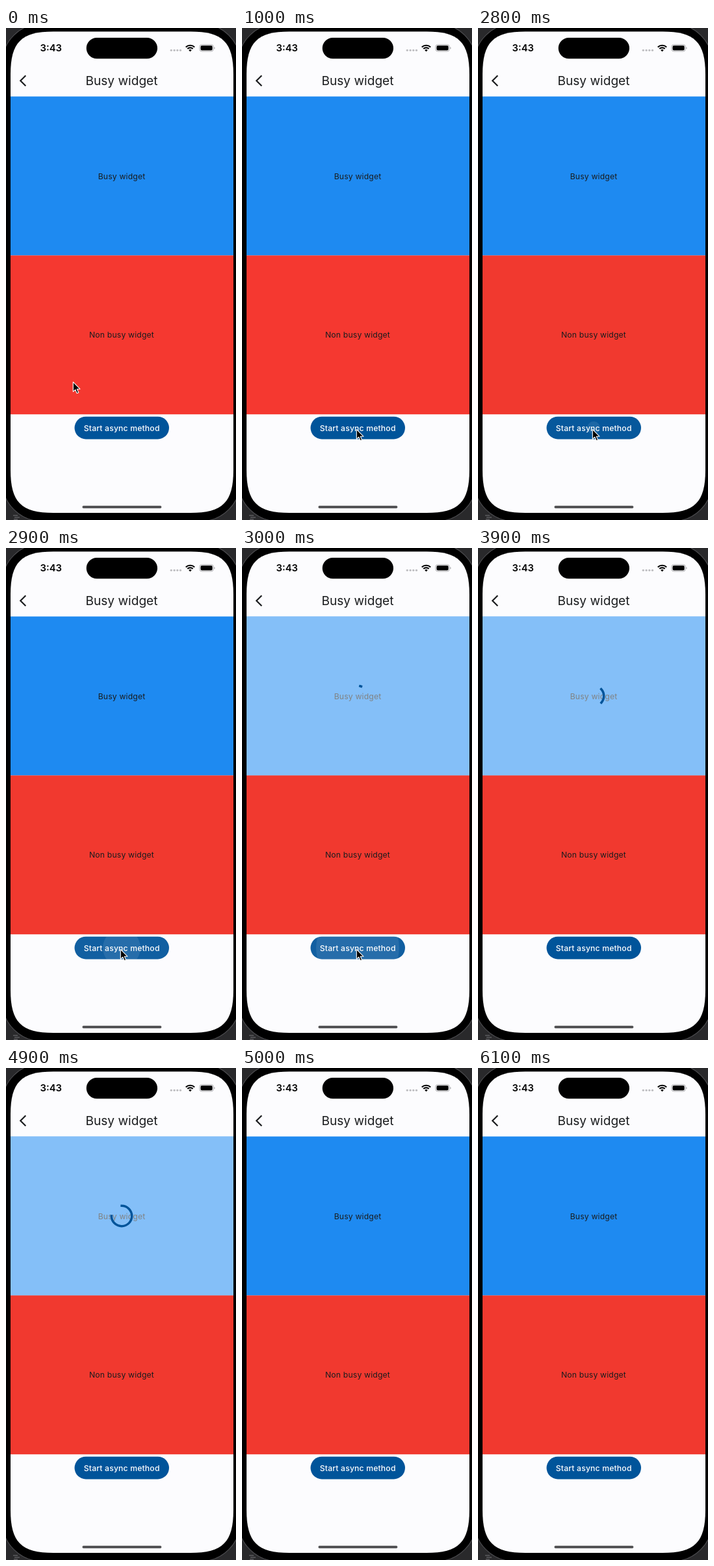
Write an HTML page that moves like this. It is 354x758 px and loops after 6500 ms.

```html
<!DOCTYPE html>
<html lang="en">
<head>
<meta charset="utf-8">
<title>Busy widget</title>
<style>
  html, body { margin: 0; width: 100%; height: 100%; overflow: hidden; background: #29292b; }
  svg { display: block; width: 100%; height: 100%; }
  text { font-family: Inter, Roboto, sans-serif; text-anchor: middle; fill: #1a1c1e; }
  .body { font-size: 12.2px; letter-spacing: .17px; }
</style>
</head>
<body>
<svg viewBox="0 0 354 758">
  <defs>
    <clipPath id="pill"><rect x="105.5" y="598.8" width="145.5" height="34.6" rx="17.3"/></clipPath>
  </defs>

  <!-- phone body -->
  <rect width="354" height="758" fill="#29292b"/>
  <path d="M11 751h7M13 754h8M12 757h6" stroke="#77777a" stroke-width="1"/>
  <rect x="-6" y="-7" width="367" height="767" rx="62" stroke="#4b4b4e" stroke-width="1.2"/>
  <path id="screen" fill="#fcfcfe"/>

  <!-- status bar -->
  <rect x="123.7" y="15" width="109.3" height="32.2" rx="16.1"/>
  <text x="69.3" y="36.2" font-size="14.8" font-weight="600" style="fill:#000">3:43</text>
  <g fill="#bdbdc0">
    <circle cx="254.3" cy="34.3" r="1.6"/><circle cx="259.1" cy="34.3" r="1.6"/>
    <circle cx="263.8" cy="34.3" r="1.6"/><circle cx="268.5" cy="34.3" r="1.6"/>
  </g>
  <g fill="none" stroke="#000" stroke-width="2.1">
    <path d="M276.8 29.4a9.6 9.6 0 0 1 13.4 0"/>
    <path d="M279.3 32.1a6 6 0 0 1 8.4 0"/>
  </g>
  <path d="M281.2 34a3.4 3.4 0 0 1 4.6 0l-2.3 2.4z"/>
  <rect x="298" y="25.6" width="21.2" height="10.4" rx="3.3" fill="none" stroke="#a4a4a6" stroke-width=".9"/>
  <rect x="299.5" y="27.1" width="18.2" height="7.4" rx="2"/>
  <path d="M320.3 29.2q1.3.4 1.3 1.7t-1.3 1.7z" fill="#a4a4a6"/>

  <!-- app bar -->
  <path d="M30.3 73.2l-8 8 8 8" fill="none" stroke="#1a1c1e" stroke-width="2.2"/>
  <text x="178" y="88" font-size="19.1">Busy widget</text>

  <!-- panels -->
  <rect x="7" y="105.5" width="343" height="245" fill="#1e8af1"/>
  <text class="body" x="178" y="232.6">Busy widget</text>
  <g id="busy">
    <rect x="7" y="105.5" width="343" height="245" fill="#fff" opacity=".45"/>
    <path id="arc" fill="none" stroke="#00549a" stroke-width="3.5" stroke-linecap="square"/>
  </g>
  <rect id="red" x="7" y="350.4" width="343" height="244.8"/>
  <text class="body" x="178" y="477.2">Non busy widget</text>

  <!-- button -->
  <g clip-path="url(#pill)">
    <rect x="105" y="598" width="147" height="36" fill="#00549a"/>
    <rect id="glow" x="105" y="598" width="147" height="36" fill="#fff"/>
    <circle id="ripple" cx="178" cy="616" fill="#fff"/>
  </g>
  <text class="body" x="178.2" y="620.6" font-weight="500" style="fill:#fff">Start async method</text>

  <rect x="117.4" y="735.9" width="122" height="4.2" rx="2.1" fill="#545456"/>
  <path id="cursor" d="M0 0v15l3.4-3.2 2.4 5.7 2.6-1.1-2.4-5.5h4.6z" stroke="#fff" stroke-width="1.1" stroke-linejoin="round"/>
</svg>
<script>
const LOOP = 6500, STEP = 100;
const PRESS = 2800, BUSY = 3000, DONE = 5000, CURSOR_OFF = 3300;
const $ = id => document.getElementById(id);
const set = (id, attrs) => {
  for (const k in attrs) $(id).setAttribute(k, attrs[k]);
};
const show = (id, on) => set(id, { visibility: on ? 'visible' : 'hidden' });
const clamp = v => Math.min(1, Math.max(0, v));

// Rounded screen with continuous corners
function screenPath(l, t, r, b, a, k) {
  return `M${l} ${t + a}C${l} ${t + k} ${l + k} ${t} ${l + a} ${t}` +
    `H${r - a}C${r - k} ${t} ${r} ${t + k} ${r} ${t + a}` +
    `V${b - a}C${r} ${b - k} ${r - k} ${b} ${r - a} ${b}` +
    `H${l + a}C${l + k} ${b} ${l} ${b - k} ${l} ${b - a}Z`;
}

// cubic-bezier(.4, 0, .2, 1)
function ease(x) {
  if (x <= 0 || x >= 1) return clamp(x);
  let lo = 0, hi = 1;
  for (let i = 0; i < 24; i++) {
    const s = (lo + hi) / 2, q = 1 - s;
    if (1.2 * q * q * s + .6 * q * s * s + s * s * s < x) lo = s; else hi = s;
  }
  return 3 * (1 - lo) * lo * lo + lo ** 3;
}

// Indeterminate Material spinner, angles in degrees clockwise from the top
function spinnerPath(ms) {
  const cx = 178, cy = 228, r = 15.7;
  const p = ms / 1333 % 1, turn = ms / 2222 % 1;
  const head = 270 * ease(p * 2), tail = 270 * ease(p * 2 - 1);
  const from = tail + turn * 360 + p * 90;
  const sweep = Math.max(head - tail, .06);
  const at = deg => {
    const a = deg * Math.PI / 180;
    return `${(cx + r * Math.sin(a)).toFixed(3)} ${(cy - r * Math.cos(a)).toFixed(3)}`;
  };
  return `M${at(from)}A${r} ${r} 0 ${sweep > 180 ? 1 : 0} 1 ${at(from + sweep)}`;
}

function draw(time) {
  const t = Math.floor(time % LOOP / STEP) * STEP;

  const move = 1 - (1 - clamp(t / 300)) ** 2;
  set('cursor', { transform: `translate(${103.3 + 73 * move} ${545.3 + 73 * move})` });
  show('cursor', t < CURSOR_OFF);

  const held = t >= PRESS ? t - PRESS : -1;
  const fade = held < 0 ? 0 : clamp((3300 - t) / 300);
  set('glow', { opacity: held < 0 ? 0 : .065 * clamp((held + 50) / 150) * fade });
  set('ripple', { r: held < 0 ? 0 : held < 100 ? 10 : 29 + .35 * (held - 100), opacity: .09 * fade });

  set('red', { fill: t < PRESS ? '#f53830' : '#f1392f' });

  const busy = t >= BUSY && t < DONE;
  show('busy', busy);
  if (busy) set('arc', { d: spinnerPath(t - BUSY + 62) });
}

set('screen', { d: screenPath(7, 5.5, 350, 747, 66, 16.5) });
const start = performance.now();
function tick() {
  draw(performance.now() - start);
  requestAnimationFrame(tick);
}
tick();
</script>
</body>
</html>
```
